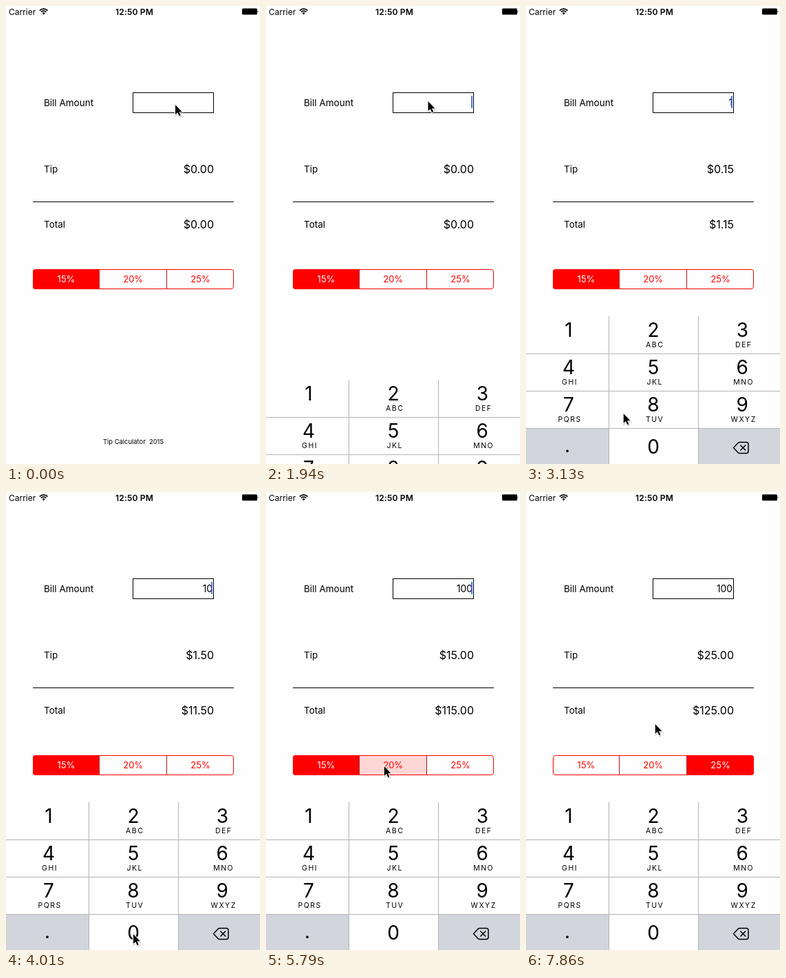
Animation, 369 px wide and 663 px high, one loop 8000 ms. Source, as an HTML page:

```html
<!DOCTYPE html>
<html lang="en">
<head>
<meta charset="utf-8">
<title>Tip Calculator</title>
<style>
  html, body { margin: 0; width: 100%; height: 100%; overflow: hidden; background: #fefefe; }
  svg { display: block; width: 369px; height: 663px; }
  text { font-family: Inter, Roboto, sans-serif; font-size: 13.5px; white-space: pre; }
  .end { text-anchor: end; }
  .mid { text-anchor: middle; }
  .money { font-size: 16px; }
  .seg { font-size: 13px; text-anchor: middle; }
  .digit { font-size: 28px; text-anchor: middle; }
  .letters { font-size: 10.5px; letter-spacing: 1.5px; text-anchor: middle; }
</style>
</head>
<body>
<svg viewBox="0 0 369 663">
  <defs>
    <clipPath id="round"><rect x="39" y="381" width="292" height="29" rx="4"/></clipPath>
  </defs>
  <rect width="369" height="663" fill="#fefefe"/>

  <text x="4" y="12.5" style="font-size:12px">Carrier</text>
  <g fill="none" stroke="#000" stroke-width="1.7">
    <path d="M48.9 6.6A8.2 8.2 0 0 1 60.5 6.6M50.95 8.65A5.3 5.3 0 0 1 58.45 8.65"/>
    <path d="M54.7 12.4L52.6 10.3A3 3 0 0 1 56.8 10.3Z" fill="#000" stroke="none"/>
  </g>
  <text x="186.5" y="12.5" class="mid" style="font-size:12px;font-weight:600;letter-spacing:.2px">12:50 PM</text>
  <rect x="343" y="3.5" width="22" height="9" rx="1.5"/>
  <path d="M365.7 6.3q1.6 1.7 0 3.4z"/>

  <text x="55" y="144.5">Bill Amount</text>
  <rect x="184.5" y="125.5" width="117" height="29" fill="none" stroke="#000"/>
  <text id="bill" class="end" x="300" y="144.5" style="font-size:13.8px"></text>
  <rect id="caret" x="298" y="130" width="2" height="18" fill="#426bf2" fill-opacity=".9"/>

  <text x="55" y="240.5">Tip</text>
  <text id="tip" class="end money" x="302" y="241.7"></text>
  <path d="M39 283.5H331" stroke="#000"/>
  <text x="55" y="320.5">Total</text>
  <text id="total" class="end money" x="302" y="321.7"></text>

  <g id="segments" clip-path="url(#round)"></g>
  <path d="M135.5 382V409M233.5 382V409" stroke="#a81818"/>
  <rect x="39.5" y="381.5" width="291" height="28" rx="3.5" fill="none" stroke="#f00"/>
  <g id="labels"></g>

  <text x="185" y="633.5" class="mid" style="font-size:9.4px">Tip Calculator&#160; 2015</text>

  <g id="pad">
    <rect width="369" height="214" fill="#fefefe"/>
    <path d="M0 162H120V214H0zM251 162H369V214H251z" fill="#d2d5dc"/>
    <g id="keys"></g>
    <path d="M0 54.5H369M0 108.5H369M0 162.5H369M120.5 0V214M250.5 0V214" stroke="#b4b4b7"/>
    <text x="60" y="197" class="digit">.</text>
    <path d="M301.5 190.5L308 183.5Q309 182.5 310.5 182.5H320q3 0 3 3V195.5q0 3-3 3H310.5Q309 198.5 308 197.5Z
             M311.8 187l7 7m0-7l-7 7" fill="none" stroke="#000" stroke-width="1.5" stroke-linejoin="round" stroke-linecap="round"/>
  </g>

  <g id="cursor">
    <path d="M0 0V14L3.2 11.1L5.6 16.2L7.7 15.3L5.4 10.3H9.8Z" transform="translate(.6 1.2)" fill="#000" opacity=".2" stroke="#000" stroke-width="2"/>
    <path d="M0 0V14L3.2 11.1L5.6 16.2L7.7 15.3L5.4 10.3H9.8Z" stroke="#fff" stroke-width="2" paint-order="stroke"/>
  </g>
</svg>
<script>
const LOOP = 8000, STEPS = 54;
const $ = id => document.getElementById(id);

function add(parent, tag, attrs, text = '') {
  const el = document.createElementNS('http://www.w3.org/2000/svg', tag);
  for (const k in attrs) el.setAttribute(k, attrs[k]);
  el.textContent = text;
  return parent.appendChild(el);
}

// Segmented control
const rates = [15, 20, 25];
const edges = [39, 135, 233, 331];
const segments = rates.map((rate, i) => ({
  box: add($('segments'), 'rect', { x: edges[i], y: 381, width: edges[i + 1] - edges[i] + (i < 2), height: 29 }),
  label: add($('labels'), 'text', { class: 'seg', x: [87.5, 184.7, 282.5][i], y: 400 }, rate + '%')
}));

// Number pad, keyed by digit
const digitX = [62, 185, 314.3], lettersX = [63.6, 187.2, 316.2], keyX = [0, 121, 251];
const letters = ['', 'ABC', 'DEF', 'GHI', 'JKL', 'MNO', 'PQRS', 'TUV', 'WXYZ'];
const keys = {};
function addKey(digit, col, row, base) {
  const y = row * 54;
  keys[digit] = add($('keys'), 'rect', { x: keyX[col], y, width: [120, 129, 118][col], height: 54, fill: '#d2d5dc' });
  add($('keys'), 'text', { class: 'digit', x: digitX[col], y: y + base }, digit);
}
letters.forEach((word, i) => {
  const col = i % 3, row = Math.floor(i / 3);
  addKey(i + 1, col, row, 30);
  add($('keys'), 'text', { class: 'letters', x: lettersX[col], y: row * 54 + 45 }, word);
});
addKey(0, 1, 3, 37);

// Pointer stops: step, x, y
const path = [
  [0, 246, 143], [1, 244, 144], [2, 244, 144], [3, 244, 145], [5, 244, 145], [6, 243, 147],
  [10, 235.5, 138], [13, 235.5, 138], [18, 62, 480], [20, 62, 480], [21, 141.7, 590],
  [25, 185, 640], [30, 185, 640], [32, 187.7, 302], [36, 171.7, 397], [40, 171.7, 397],
  [44, 306.7, 397], [48, 306.7, 397], [53, 187.7, 336], [54, 187.7, 336]
];
const caretOff = [[0, 13], [16, 18], [23, 25], [33, 35], [40, 43], [46, 49], [52, 54]];

const within = (s, from, to) => s >= from && s < to;
const show = (el, on) => el.setAttribute('visibility', on ? 'visible' : 'hidden');
const money = v => '$' + v.toFixed(2);

function pointer(s) {
  const i = path.findIndex(p => p[0] > s);
  const a = path[i - 1], b = path[i];
  const u = (s - a[0]) / (b[0] - a[0]), e = u * u * (3 - 2 * u);
  return [1, 2].map(k => a[k] + (b[k] - a[k]) * e);
}

function draw(s) {
  const bill = s < 20 ? 0 : s < 27 ? 1 : s < 30 ? 10 : 100;
  const chosen = s < 40 ? 0 : s < 48 ? 1 : 2;
  const pressed = within(s, 39, 40) ? 1 : within(s, 46, 48) ? 2 : -1;
  const tip = bill * rates[chosen] / 100;

  $('bill').textContent = bill || '';
  $('tip').textContent = money(tip);
  $('total').textContent = money(bill + tip);
  show($('caret'), !caretOff.some(r => within(s, ...r)));

  segments.forEach(({ box, label }, i) => {
    box.setAttribute('fill', i === chosen ? '#f00' : i === pressed ? '#ffd6d6' : '#fefefe');
    label.setAttribute('fill', i === chosen ? '#fff' : '#f00');
  });

  const top = s < 13 ? 663 : Math.round(449 + 92 * Math.exp(-1.8 * (s - 13)));
  $('pad').setAttribute('transform', `translate(0 ${top})`);
  for (const d in keys) show(keys[d], false);
  if (within(s, 18, 20)) show(keys[1], true);
  if (within(s, 25, 27) || s === 29) show(keys[0], true);

  $('cursor').setAttribute('transform', `translate(${pointer(s)})`);
}

function tick() {
  draw(Math.floor(performance.now() % LOOP / LOOP * STEPS));
  requestAnimationFrame(tick);
}
tick();
</script>
</body>
</html>
```
